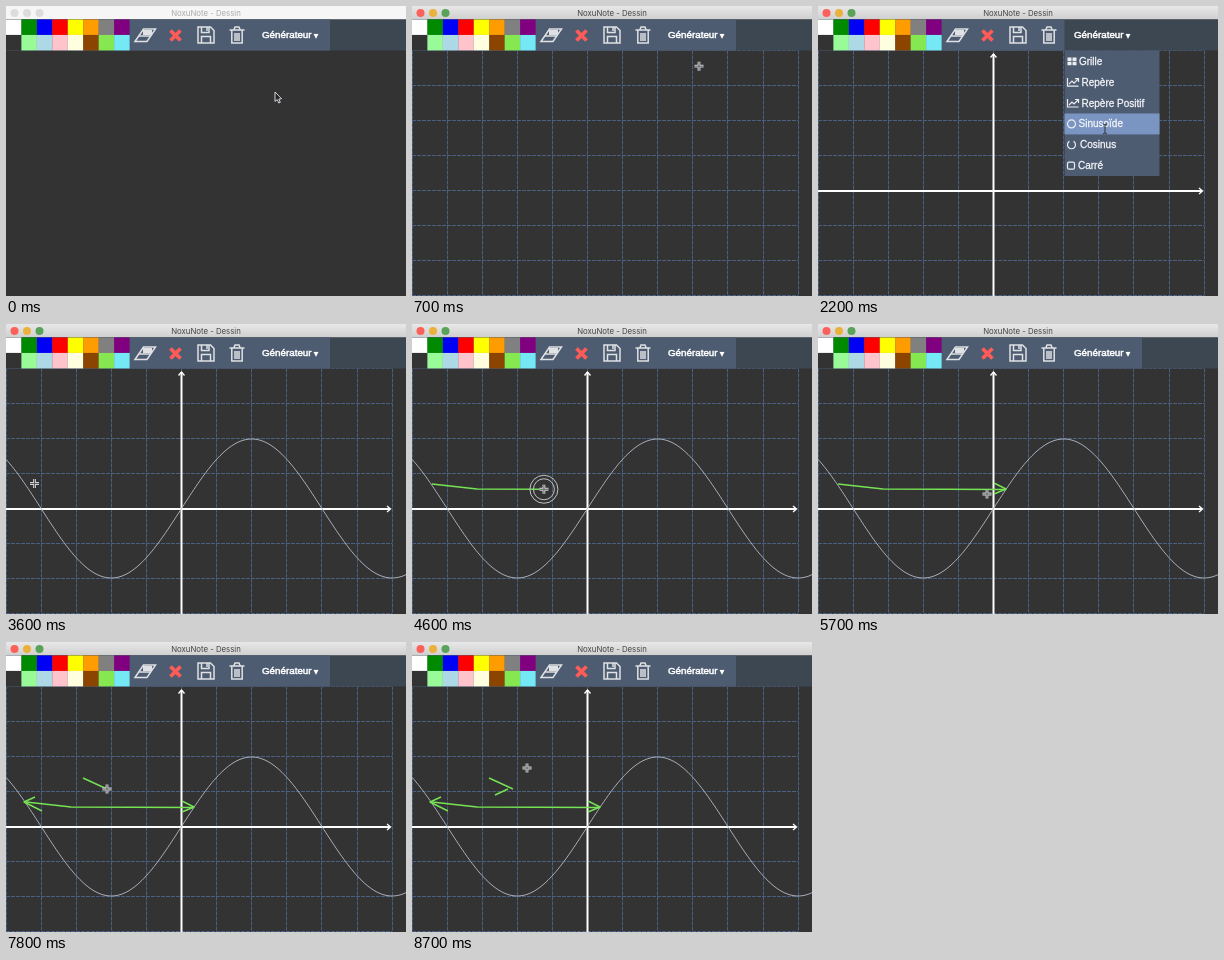
An HTML page with a canvas that plays this animation: 400 by 290 pixels, repeating every 9.7 s.

```html
<!DOCTYPE html>
<html lang="fr">
<head>
<meta charset="utf-8">
<title>Dessin</title>
<style>
  html, body { margin: 0; width: 100%; height: 100%; overflow: hidden; background: #333; }
  canvas { display: block; width: 400px; height: 290px; }
</style>
</head>
<body>
<canvas width="400" height="290"></canvas>
<script>
const ctx = document.querySelector('canvas').getContext('2d');
const LOOP = 9700, STEP = 100;
const SANS = '"Liberation Sans", Arial, sans-serif';
const BAR = '#4e5c72', DARK = '#3d4752', ICON = '#dfe1e4', GREEN = '#76e354';
const TOP = 13.5, BOTTOM = 44.5, CELL = 15.45;
const ORIGIN = [175.5, 185], GAP = 35.1;

const swatches = [
  'white #008a00 #0000f5 red yellow #ff9c00 gray purple',
  '#333 palegreen lightblue #ffc4cb lightyellow #8b4500 #86e851 #74e9f5'
].map(row => row.split(' '));

const icons = {
  eraser: 'M129 35.5 137.5 23H149.5L141 35.5ZM133 30H145',
  cross: 'M164.5 24.5 174.5 34.5M174.5 24.5 164.5 34.5',
  floppy: 'M192 21H204.5L208 24.5V37H192ZM195.5 37V30.5H204.5V37M195.5 21V26.5H203V21M201 21V25',
  trash: 'M223.5 24H238.5M228 23.5 229 21H233L234 23.5M225.8 24V37H236.2V24M229 27V35M231 27V35M233 27V35',
  chart: 'M0-4V4H11M1.5 2 4.5-1 6.5 1 10.5-3M7.5-3.5H11V0',
  tiles: 'M0-2H4M5-2H9M0 2.3H4M5 2.3H9',
  circle: 'M0 0A4 4 0 1 1 8 0A4 4 0 1 1 0 0',
  openCircle: 'M2-3.5A4 4 0 1 0 6-3.5',
  square: 'M1.5-3.5H5.5Q7-3.5 7-2V2Q7 3.5 5.5 3.5H1.5Q0 3.5 0 2V-2Q0-3.5 1.5-3.5Z',
  arrow: 'M0 0V9.5L2.2 7.5 3.8 11 5.3 10.3 3.8 7 6.6 6.8Z',
  beam: 'M-2-5 0-4 2-5M0-4V4M-2 5 0 4 2 5',
  plus: 'M-4.5 0H4.5M0-4.5V4.5',
  head: 'M-3.5-3 0 0-3.5 3'
};
const items = [
  ['Grille', 'tiles', 261], ['Repère', 'chart', 263.5], ['Repère Positif', 'chart', 263.5],
  ['Sinusoïde', 'circle', 260.5], ['Cosinus', 'openCircle', 262], ['Carré', 'square', 260]
];
const itemY = row => 55.2 + 20.9 * row;

// The pointer's story is recorded as consecutive segments.
const segments = [], menus = [];
let clock = 0, here = [269, 86];

function add(ms, points, options = {}) {
  segments.push({ start: clock, end: clock + ms, points: [here, ...points], ...options });
  clock += ms;
  here = points[points.length - 1];
}
const move = (ms, point) => add(ms, [point], { eased: true });
const wait = ms => add(ms, [here]);
const click = () => add(100, [here], { pressed: true });
const draw = (ms, ...points) => add(ms, points, { pressed: true, ink: true });

function choose(row, ms) {
  const start = clock;
  move(ms, [287, itemY(row) + 5]);
  wait(100);
  click();
  menus.push({ start, end: clock });
}

const BUTTON = [287, 31];
wait(200);
move(200, BUTTON);
choose(0, 100);
move(300, BUTTON);
choose(1, 300);
move(300, BUTTON);
wait(200);
choose(3, 200);
move(700, [6.5 * CELL, 37]);
click();
move(400, [28.5, 159.5]);
move(400, [20, 160]);
draw(900, [65, 165], [188, 165.5]);
move(200, [176, 159]);
draw(500, [188, 165], [176, 170]);
move(100, [169, 170]);
move(700, [29, 155]);
draw(700, [18, 160], [36, 169]);
move(400, [77, 136]);
draw(300, [101, 147]);
move(100, [96, 147]);
draw(300, [83, 153]);
move(500, [115, 126]);
wait(LOOP - clock);

// The first part of a polyline, cut at share k of its length.
function cut(points, k) {
  const length = i => Math.hypot(points[i][0] - points[i - 1][0], points[i][1] - points[i - 1][1]);
  let left = 0;
  for (let i = 1; i < points.length; i++) left += length(i) * k;
  const result = [points[0]];
  for (let i = 1; i < points.length && left > 0; i++) {
    const share = Math.min(1, left / length(i));
    result.push(points[i].map((v, axis) => points[i - 1][axis] + (v - points[i - 1][axis]) * share));
    left -= length(i);
  }
  return result;
}

function trace({ start, end, points, eased }, t) {
  const k = Math.min(1, (t - start) / (end - start));
  return cut(points, eased ? k * k * (3 - 2 * k) : k);
}

function rect(x, y, w, h, color) {
  ctx.fillStyle = color;
  ctx.fillRect(x, y, w, h);
}

function line(points, color, width = 1) {
  ctx.beginPath();
  points.forEach(([x, y]) => ctx.lineTo(x, y));
  ctx.strokeStyle = color;
  ctx.lineWidth = width;
  ctx.stroke();
}

function circle(x, y, r, fill, stroke) {
  ctx.beginPath();
  ctx.arc(x, y, r, 0, 2 * Math.PI);
  ctx.fillStyle = fill;
  ctx.strokeStyle = stroke;
  ctx.lineWidth = 1;
  if (fill) ctx.fill();
  if (stroke) ctx.stroke();
}

function icon(name, x, y, color, width, { fill, angle = 0 } = {}) {
  const shape = new Path2D(icons[name]);
  ctx.save();
  ctx.translate(x, y);
  ctx.rotate(angle);
  ctx.strokeStyle = color;
  ctx.lineWidth = width;
  if (fill) {
    ctx.fillStyle = fill;
    ctx.fill(shape);
  }
  ctx.stroke(shape);
  ctx.restore();
}

function text(string, x, y, font, color, heavy = 0) {
  ctx.font = font;
  ctx.fillStyle = ctx.strokeStyle = color;
  ctx.fillText(string, x, y);
  ctx.lineWidth = heavy;
  if (heavy) ctx.strokeText(string, x, y);
}

function titleBar(active) {
  const shade = ctx.createLinearGradient(0, 0, 0, TOP);
  shade.addColorStop(0, active ? '#e9e8e9' : '#f6f6f6');
  shade.addColorStop(1, active ? '#d0cfd0' : '#f6f6f6');
  rect(0, 0, 400, TOP, shade);
  ['#fc605b', '#eab13c', '#58a35a'].forEach((color, i) =>
    circle(8.5 + 12.5 * i, 7, 4, active ? color : '#dcdcdc'));
  ctx.textAlign = 'center';
  text('NoxuNote - Dessin', 200, 10, '7.8px Inter, sans-serif', active ? '#444' : '#aaa');
  ctx.textAlign = 'left';
}

function toolbar(open) {
  rect(0, TOP, 400, BOTTOM - TOP, DARK);
  rect(0, TOP, open ? 246.5 : 324, BOTTOM - TOP, BAR);
  swatches.forEach((row, j) => row.forEach((color, i) =>
    rect(i * CELL, TOP + j * CELL, CELL, CELL, color)));
  icon('eraser', 0, 0, ICON, 1.5);
  rect(137, 24, 9, 5, ICON);
  icon('cross', 0, 0, '#ff5b57', 3.8);
  icon('floppy', 0, 0, ICON, 1.5);
  icon('trash', 0, 0, ICON, 1.5);
  text('Générateur', 256, 32, `9.8px ${SANS}`, '#fff', .5);
  text('▾', 307.5, 33, '10px "DejaVu Sans", sans-serif', '#fff');
}

function menu(y) {
  rect(246.5, BOTTOM, 95, 125.5, BAR);
  items.forEach(([label, name, x], row) => {
    const middle = itemY(row);
    if (Math.abs(y - middle) < 10.4) rect(246.5, middle - 10.4, 95, 20.9, '#7b95c3');
    icon(name, 249.5, middle, '#eceef1', name === 'tiles' ? 3.5 : 1.2);
    text(label, x, middle + 3.5, `10px ${SANS}`, '#f4f5f7', .3);
  });
}

function grid() {
  ctx.setLineDash([4, 1]);
  for (let i = 0; i < 12; i++) {
    const x = Math.floor(GAP * i) + .5, y = BOTTOM + 35 * i;
    line([[x, BOTTOM], [x, 290]], '#496080');
    line([[0, y], [386, y]], '#496080');
  }
  ctx.setLineDash([]);
}

function axes() {
  const [x, y] = ORIGIN;
  line([[0, y], [384, y]], '#fff', 2);
  line([[x, 48], [x, 290]], '#fff', 2);
  icon('head', 384.5, y, '#fff', 1.3);
  icon('head', x, 48, '#fff', 1.3, { angle: -Math.PI / 2 });
}

function sine() {
  const points = Array.from({ length: 201 }, (_, i) =>
    [2 * i, ORIGIN[1] - .5 - 69.5 * Math.sin((2 * i - ORIGIN[0]) * Math.PI / (4 * GAP))]);
  line(points, '#b4bac7', .9);
}

function drawPointer(x, y, open, pressed, hasGrid) {
  if (pressed) for (const r of [10.5, 14]) circle(x, y, r, null, '#c0c3c6');
  if (open && Math.abs(y - itemY(3)) < 10) {
    icon('beam', x, y, '#333', 1);
  } else if (hasGrid && !open && y > BOTTOM) {
    icon('plus', x, y, '#d0d3d6', 2.8);
    icon('plus', x, y, '#555', .9);
  } else {
    icon('arrow', x, y, '#e4e8f0', .9, { fill: '#222' });
  }
}

function render(t) {
  const open = menus.some(({ start, end }) => t >= start && t < end);
  const current = segments.find(({ end }) => t < end);
  const [x, y] = trace(current, t).pop();
  rect(0, 0, 400, 290, '#333');
  [grid, axes, sine].forEach((layer, i) => t >= menus[i].end && layer());
  ctx.lineJoin = 'round';
  segments.filter(({ ink, start }) => ink && start <= t)
    .forEach(stroke => line(trace(stroke, t), GREEN, 1.4));
  ctx.lineJoin = 'miter';
  titleBar(t >= 200);
  toolbar(open);
  if (open) menu(y);
  drawPointer(x, y, open, current.pressed, t >= menus[0].end);
}

const began = performance.now();
function tick() {
  const t = (performance.now() - began) % LOOP;
  render(Math.floor(t / STEP) * STEP);
  requestAnimationFrame(tick);
}
tick();
</script>
</body>
</html>
```
